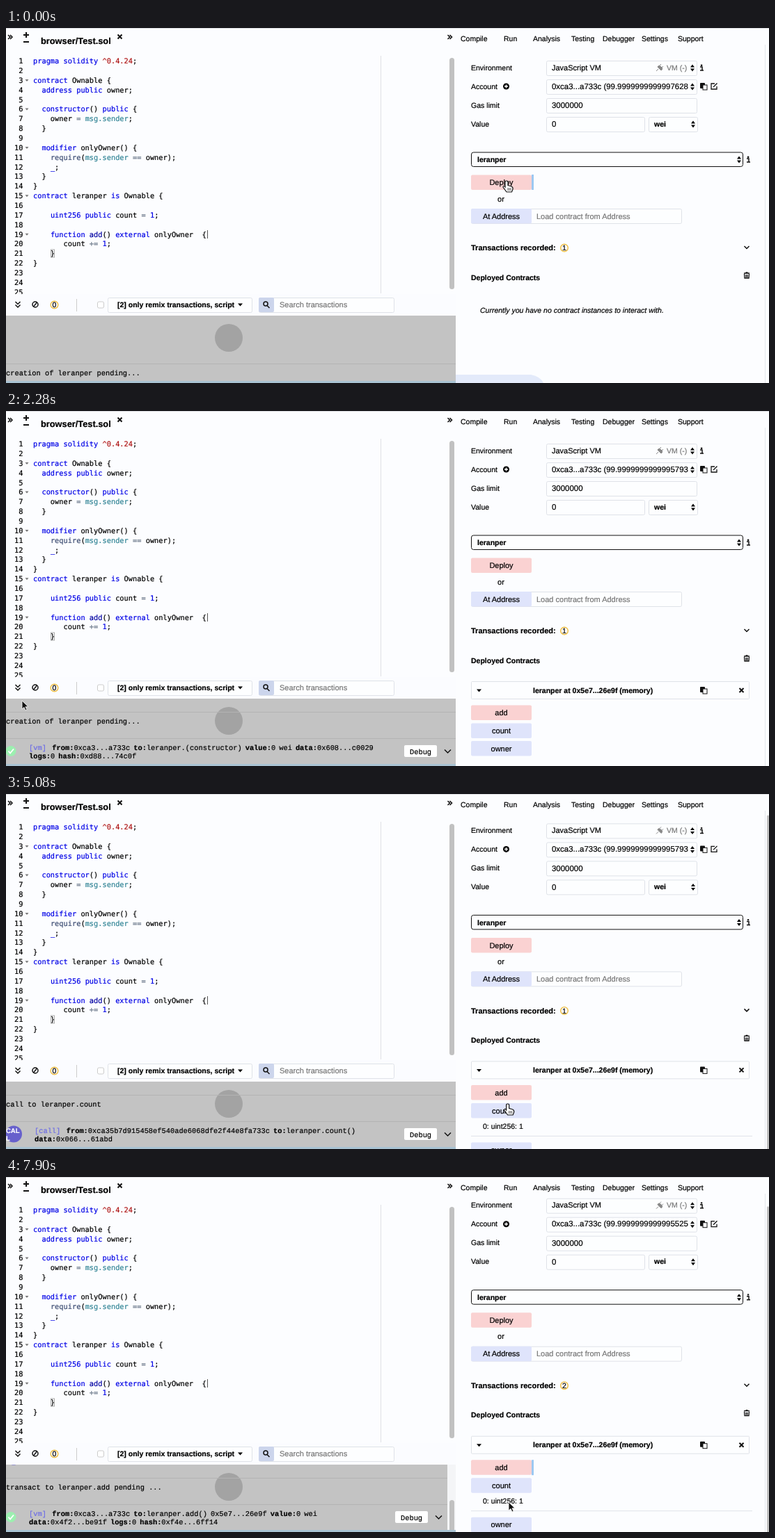
An HTML page that plays this animation: 1096 px wide and 511 px high, repeating every 8 s.

```html
<!DOCTYPE html>
<html lang="en">
<head>
<meta charset="utf-8">
<title>Contract deployment</title>
<style>
html, body { margin: 0; width: 100%; height: 100%; overflow: hidden; background: #fcfdff; }
svg { display: block; width: 1096px; height: 511px; }
text { font: 10.5px "Liberation Sans", Arial, sans-serif; color: #000; white-space: pre; text-rendering: geometricPrecision; }
text, tspan { fill: currentColor; stroke: currentColor; stroke-width: .2px; }
.b { font-weight: bold; }
.m { text-anchor: middle; }
.e { text-anchor: end; }
.i { font-size: 11px; }
.n { font-size: 11.45px; }
.g { color: #777; }
.it { font-style: italic; }
.file { font-size: 12.8px; font-weight: bold; }
.code { font: 10.33px "DejaVu Sans Mono", monospace; }
.log { font: 10.37px "Liberation Mono", "Courier New", monospace; }
.tight { word-spacing: -1.2px; }
.tag { color: #6c6ce6; }
.badge { font-size: 9.5px; font-weight: bold; color: #fff; }
.kw { color: #0000e6; } .ver { color: #b01818; } .sup { color: #318495; } .op { color: #687687; }
.call { color: #3c4c72; } .name { color: #0000a2; }
.line { fill: none; stroke: #111; stroke-width: 1.5; }
</style>
</head>
<body>
<svg id="stage" viewBox="0 0 1096 511">
  <defs><clipPath id="logClip"><rect y="414" width="646" height="94"/></clipPath></defs>
  <g id="editor"></g><g id="panel"></g><g id="log" clip-path="url(#logClip)"></g><g id="pointer"></g>
</svg>
<script>
const STEP = 148.9, LOOP = 8000;
const DEPLOYED = 1, EXPANDED = 8, CALLED = 26, PENDING = 47, ADDED = 48;
const $ = id => document.getElementById(id);

// y is the optical middle of the line
const text = (x, y, s, cls = '') => `<text x="${x}" y="${y + 3.8}" class="${cls}">${s}</text>`;
const rect = (x, y, w, h, fill, stroke = 'none', r = 2) =>
  `<rect x="${x}" y="${y}" width="${w}" height="${h}" rx="${r}" fill="${fill}" stroke="${stroke}"/>`;
const path = (d, attrs = 'class="line"') => `<path d="${d}" ${attrs}/>`;
const ring = (x, y, r, stroke, w = 1.5) => `<circle cx="${x}" cy="${y}" r="${r}" fill="none" stroke="${stroke}" stroke-width="${w}"/>`;
const field = (x, y, w) => rect(x + .5, y + .5, w - 1, 21, '#fdfeff', '#dfe2e8');
const button = (y, label, fill) => rect(668, y, 87, 21.5, fill) + text(711.5, y + 11, label, 'i m');
const sorter = (x, y) => path(`M${x - 3} ${y - 1}l3-4 3 4zM${x - 3} ${y + 1}l3 4 3-4z`, '');
const info = (x, y) => rect(x - 1.2, y - 4.5, 2.6, 2.4, '#111', 'none', 1) + path(`M${x - 2} ${y - 1}h3v5M${x - 2} ${y + 4}h5`);
const cross = (x, y) => path(`M${x - 3} ${y - 3}l6 6m0-6l-6 6`, 'stroke="#111" stroke-width="2"');
const copyIcon = (x, y) => rect(x - 5, y - 5, 7, 8, '#111', 'none', 1) + rect(x - 1, y - 2, 6, 7, '#fff', '#111', 0);
const counter = (x, y, n) => ring(x, y, 5.3, '#eebc3c', 1.4) + text(x, y, n, 'm');
const PINK = '#fad2d2', BLUE = '#dfe4fb';

const source = `pragma solidity ^0.4.24;

contract Ownable {
  address public owner;

  constructor() public {
    owner = msg.sender;
  }

  modifier onlyOwner() {
    require(msg.sender == owner);
    _;
  }
}
contract leranper is Ownable {

    uint256 public count = 1;

    function add() external onlyOwner  {
       count += 1;
    }
}


`.split('\n');

const tokens = /\b(?<kw>pragma|solidity|contract|address|public|constructor|modifier|is|uint256|function|external|_|1)\b|(?<ver>\^[\d.]+)|(?<sup>msg\.sender)|(?<call>require)|(?<name>\badd\b)|(?<op>==|\+=|=)/g;
const colour = line => line.replace(tokens, (s, ...rest) => {
  const groups = rest.at(-1);
  return `<tspan class="${Object.keys(groups).find(k => groups[k])}">${s}</tspan>`;
});

function drawEditor() {
  let s = rect(0, 0, 1096, 1, '#dcdee2', 'none', 0)
    + path('M3 10l3 3-3 3m3-6l3 3-3 3M634.5 10l3 3-3 3m3-6l3 3-3 3')
    + path('M25 10h8m-4-4v8M25 20h8', 'stroke="#111" stroke-width="2"')
    + text(50, 19.2, 'browser/Test.sol', 'file') + cross(163.5, 12.5)
    + path('M538.5 40V382', 'stroke="#dfe1e5"') + rect(637, 43, 7, 333, '#c1c1c1', 'none', 3.5);
  source.forEach((line, i) => {
    const y = 47.3 + i * 13.857;
    s += text(24.5, y, i + 1, 'code e') + text(39, y, colour(line), 'code');
    if (/{$/.test(line)) s += path(`M27.5 ${y - 1}h5l-2.5 3z`, 'fill="#777"');
  });
  s += rect(64.5, 319, 5, 11, 'none', '#aaa', 0) + path('M289.5 291v12', 'stroke="#555"');

  // terminal toolbar
  s += rect(0, 383, 646, 31, '#fbfcff', 'none', 0)
    + path('M13.5 394l3.5 3.5 3.5-3.5m-7 4.5l3.5 3.5 3.5-3.5')
    + ring(42, 398, 4, '#111') + path('M39.5 401l5-6') + counter(69.5, 398.5, 0)
    + path('M101.5 390v18', 'stroke="#ccc"') + rect(131.5, 394, 9, 9, '#fff', '#ccc')
    + field(146, 388, 208) + text(160, 398.5, '[2] only remix transactions, script', 'b')
    + path('M333 396.5h7l-3.5 4z', '')
    + field(363, 388, 195) + rect(363, 388, 22, 21, '#ccd5ec')
    + ring(373, 397, 3, '#111') + path('M375 399.5l3.5 3.5') + text(393, 398.5, 'Search transactions', 'i g');

  s += rect(0, 414, 646, 94, '#c3c3c3', 'none', 0) + rect(0, 508, 646, 3, '#a9c3d3', 'none', 0)
    + '<circle cx="320" cy="446" r="20" fill="#a3a3a3"/>';

  [['Compile', 653], ['Run', 715], ['Analysis', 757], ['Testing', 812], ['Debugger', 857], ['Settings', 913], ['Support', 965]]
    .forEach(([name, x]) => s += text(x, 15.5, name));
  $('editor').innerHTML = s + path('M1090.5 24V511', 'stroke="#e4e7ec"');
}

function drawPanel(step) {
  const called = step >= CALLED, open = step >= EXPANDED;
  const digits = step < DEPLOYED ? '7628' : step < ADDED ? '5793' : '5525';
  const focus = y => rect(755, y, 3, 22, '#9cc8f2', 'none', 0);
  const scroll = along([[33, 0], [36, 13.8], [38, 16.3]], step)[0];

  let s = text(668, 57, 'Environment') + field(776, 47, 217) + text(784, 57, 'JavaScript VM', 'i')
    + path('M934 62l3-3m-1-3l5 5c2-1 2-3 1-4l-2-2c-2-1-3-1-4 1m3-2l2-2m1 5l2-2', 'fill="#888" stroke="#888"')
    + text(949, 57, 'VM (-)', 'g') + sorter(986, 57.5) + info(999, 57)
    + text(668, 84, 'Account') + '<circle cx="718.5" cy="84" r="4.5"/>' + path('M716 84h5m-2.5-2.5v5', 'stroke="#fff" stroke-width="1.4"')
    + field(776, 74, 217) + text(784, 84, '0xca3...a733c (99.999999999999' + digits, 'n')
    + sorter(986, 84.5) + copyIcon(1002, 84)
    + path('M1018 80h-5v8h8v-4m-5 1l5.5-5.5', 'fill="none" stroke="#111" stroke-width="1.3"')
    + text(668, 111, 'Gas limit') + field(776, 101, 217) + text(784, 111.5, '3000000', 'n')
    + text(668, 138, 'Value') + field(776, 128, 142) + text(784, 138.5, '0', 'n')
    + field(923, 128, 71) + text(931, 138, 'wei', 'b') + sorter(987, 138.5)
    + rect(668.5, 179, 390, 20.5, '#fdfeff', '#111', 3) + text(677, 189.5, 'leranper', 'b')
    + sorter(1053, 189.5) + info(1066, 189)
    + button(211.5, 'Deploy', PINK) + (open ? '' : focus(211)) + text(711, 246, 'or', 'i m')
    + field(668, 260, 303) + button(260, 'At Address', BLUE) + text(762, 271, 'Load contract from Address', 'i g')
    + text(668, 316.5, 'Transactions recorded:', 'b i') + counter(802, 316.5, step < ADDED ? 1 : 2)
    + path('M1060.5 314l3.5 3.5 3.5-3.5') + text(668, 359, 'Deployed Contracts', 'b')
    + path('M1060 353h8m-5.5-1h3m-5 2l.5 6h6l.5-6m-4.5 1v4m2-4v4', 'fill="none" stroke="#111" stroke-width="1.3"');

  if (step < DEPLOYED) {
    s += text(681, 406, 'Currently you have no contract instances to interact with.', 'it');
  } else {
    s += rect(668.5, 389.5, 399, 25, '#fdfeff', '#dfe2e8', 1)
      + path(open ? 'M676 400.5h7l-3.5 4z' : 'M677 398.5l4 3.5-4 3.5z', '')
      + text(open ? 757 : 756, 402, 'leranper at 0x5e7...26e9f (memory)', 'b') + copyIcon(1002, 402) + cross(1056.5, 402);
  }
  if (open) {
    s += button(423.5, 'add', PINK) + button(449.5, 'count', BLUE) + button(called ? 506 : 475, 'owner', BLUE);
    if (step >= PENDING) s += focus(423.5);
  }
  if (called) s += text(685, 483, '0: uint256: 1') + path('M668 497H1072', 'stroke="#dfe2e8"');

  $('panel').innerHTML = `<g transform="translate(0 ${-scroll})">${s}</g>`
    + (open ? '' : path('M646 499h108q14 3 18 12h-126z', 'fill="#e3eafa"'))
    + (called ? rect(1093, 26 + scroll, 3, 490, '#c1c1c1', 'none', 1.5) : '');
}

const bold = s => s.replace(/\w+:/g, '<tspan font-weight="bold">$&</tspan>');
const rowLine = y => path(`M0 ${y}H646`, 'stroke="#b3b3b3"');
const pending = (y, s) => rowLine(y - 12.5) + text(0, y, s, 'log');

function result(x, tag, top, bottom, shift = 0) {
  const icon = tag === '[call]'
    ? '<circle cx="11" cy="489.5" r="12" fill="#6760cc"/>' + text(0, 484, 'CAL', 'badge') + text(0, 495, 'L', 'badge')
    : '<circle cx="7" cy="489.5" r="7.5" fill="#9cefb0"/>' + path('M3.5 489.5l2.5 3 5-6', 'fill="none" stroke="#fff" stroke-width="1.8"');
  return rowLine(471.5) + icon + text(x, 484, tag, 'log tag')
    + text(x + (tag.length + 1) * 6.22 + 2.2, 484, bold(top), 'log tight') + text(x, 496, bold(bottom), 'log tight')
    + rect(572 - shift, 481, 47, 17, '#fff') + text(580 - shift, 490, 'Debug', 'log')
    + path(`M${630 - shift} 487.5l4.5 4.5 4.5-4.5`);
}

function drawLog(step) {
  const created = 'creation of leranper pending...', adding = 'transact to leranper.add pending ...';
  const call = pending(446, 'call to leranper.count')
    + result(41, '[call]', 'from:0xca35b7d915458ef540ade6068dfe2f44e8fa733c to:leranper.count()', 'data:0x066...61abd');
  const raised = dy => `<g transform="translate(0 ${-dy})">${call}</g>`;
  let s;
  if (step < DEPLOYED) s = pending(496, created);
  else if (step < CALLED) s = pending(446, created)
    + result(33, '[vm]', 'from:0xca3...a733c to:leranper.(constructor) value:0 wei data:0x608...c0029', 'logs:0 hash:0xd88...74c0f');
  else if (step < PENDING) s = call;
  else if (step < ADDED) s = raised(37) + pending(496, adding);
  else s = raised(87) + pending(446, adding)
    + result(33, '[vm]', 'from:0xca3...a733c to:leranper.add() 0x5e7...26e9f value:0 wei', 'data:0x4f2...be91f logs:0 hash:0xf4e...6ff14', 13)
    + rect(634, 414, 12, 94, '#f4f5f7', 'none', 0) + rect(637, 465, 7, 50, '#c1c1c1', 'none', 3.5);
  $('log').innerHTML = s;
}

// linear path through [step, ...values]
function along(keys, step) {
  const next = keys.findIndex(k => k[0] > step);
  if (next === 0) return keys[0].slice(1);
  if (next < 0) return keys.at(-1).slice(1);
  const a = keys[next - 1], b = keys[next], p = (step - a[0]) / (b[0] - a[0]);
  return a.slice(1).map((v, i) => v + (b[i + 1] - v) * p);
}

const route = [[0, 719, 220], [4, 677, 398], [9, 677, 398], [14, 60, 425], [15, 23, 417], [16, 30, 400], [18, 40, 427],
  [19, 40, 427], [20, 5, 460], [23, 760, 484], [24, 718, 455], [26, 718, 455], [29, 568, 462], [31, 500, 470],
  [33, 720, 450], [36, 722, 438], [41, 720, 438], [43, 477, 440], [45, 706, 421], [47, 706, 421], [53, 722, 468]];
const onButton = [[0, 0], [4, 9], [24, 26], [33, 41], [45, 48]];
const HAND = 'M-2 2q0-2 2-2t2 2v4.5l5 1.5q2.5 1 2 4l-1.5 4h-7.5l-5-7q0-2 2-1.5l1 1.5z';
const ARROW = 'M0 0v12l3-2.5 2 4.5 2-1-2-4.2h4z';

function drawPointer(step) {
  const [x, y] = along(route, step);
  const hand = onButton.some(([a, b]) => step >= a && step <= b);
  $('pointer').innerHTML = `<g transform="translate(${x} ${y})">`
    + (hand ? path(HAND, 'fill="#fff" stroke="#111" stroke-width="1.2"') + path('M2 10v4m2-4v4m2-4v4', 'stroke="#111" stroke-width=".7"')
            : path(ARROW, 'fill="#111" stroke="#fff" stroke-width=".8"')) + '</g>';
}

let shown = -1;
function tick() {
  const step = Math.floor(performance.now() % LOOP / STEP);
  if (step !== shown) {
    shown = step;
    drawPanel(step);
    drawLog(step);
    drawPointer(step);
  }
  requestAnimationFrame(tick);
}
drawEditor();
tick();
</script>
</body>
</html>
```
